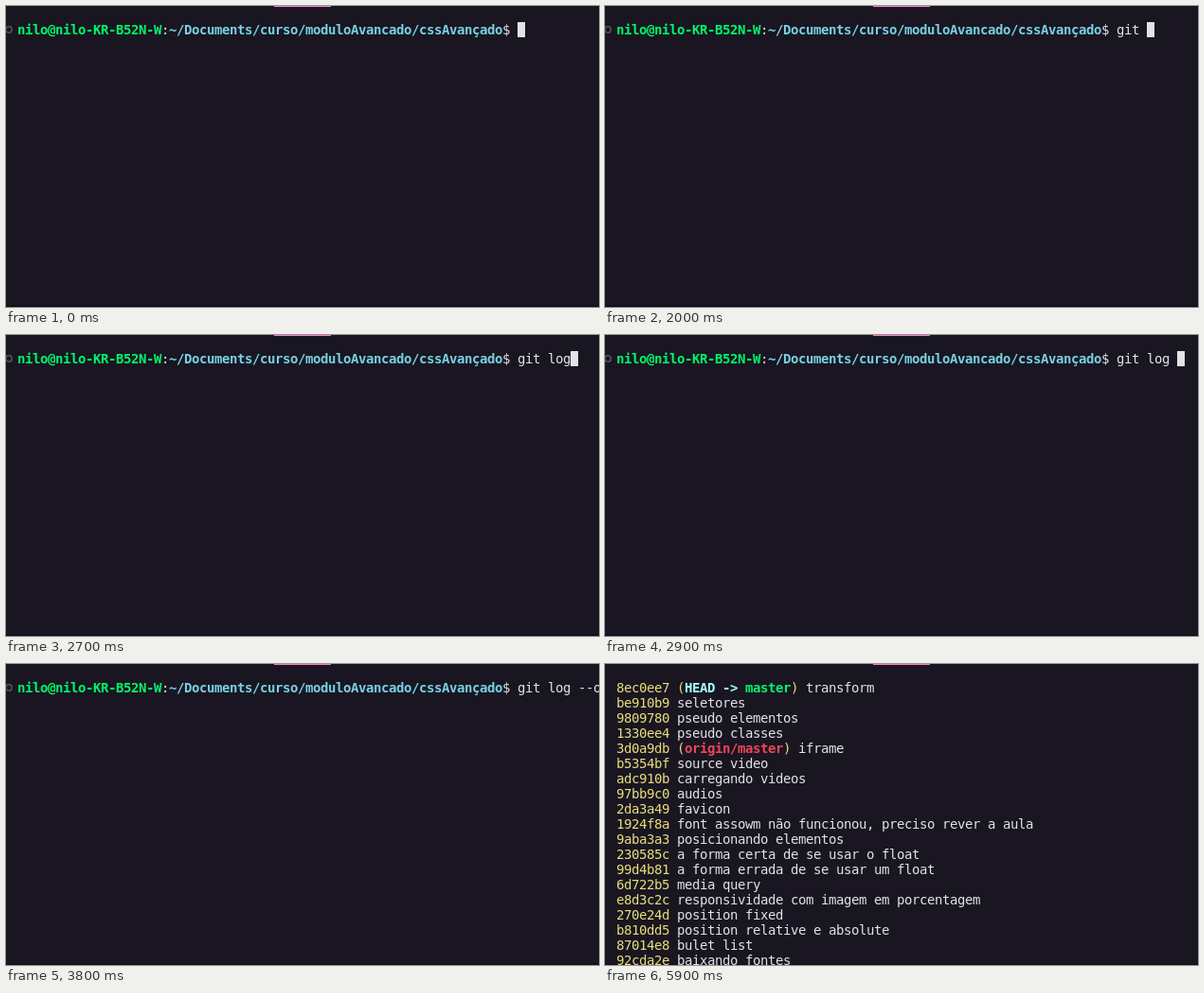
Recreate the animation shown at these times as an HTML page with a canvas. Size 626 by 318 pixels, loop 8000 ms.

```html
<!DOCTYPE html>
<html lang="pt">
<head>
<meta charset="utf-8">
<title>git log</title>
<style>
  html, body { margin: 0; width: 100%; height: 100%; overflow: hidden; background: #191622; }
  canvas { display: block; }
</style>
</head>
<body>
<canvas id="stage" width="626" height="318"></canvas>
<script>
const ctx = document.getElementById('stage').getContext('2d');
const LOOP = 8000, CELL = 8, ROW = 16, LEFT = 12, TOP = 17;
const OUTPUT_AT = 5700, SCROLL_AT = 5900;
const BACK = '#191622', FORE = '#e1e1e6', GREEN = '#00f769', BLUE = '#78d1e1',
      CYAN = '#a4ffff', YELLOW = '#e7de79', RED = '#ed4556', PINK = '#ff79c6';

const command = 'git log --o';
const keyTimes = [1400, 1600, 1800, 2000, 2100, 2400, 2700, 2900, 3100, 3300, 3800];

// Each run is [text, colour, bold].
const prompt = [
  ['nilo@nilo-KR-B52N-W', GREEN, true],
  [':', FORE],
  ['~/Documents/curso/moduloAvancado/cssAvançado', BLUE, true],
  ['$ ', FORE],
];
const refs = {
  '8ec0ee7': [['HEAD -> ', CYAN, true], ['master', GREEN, true]],
  '3d0a9db': [['origin/master', RED, true]],
};
const log = `8ec0ee7 transform
be910b9 seletores
9809780 pseudo elementos
1330ee4 pseudo classes
3d0a9db iframe
b5354bf source video
adc910b carregando videos
97bb9c0 audios
2da3a49 favicon
1924f8a font assowm não funcionou, preciso rever a aula
9aba3a3 posicionando elementos
230585c a forma certa de se usar o float
99d4b81 a forma errada de se usar um float
6d722b5 media query
e8d3c2c responsividade com imagem em porcentagem
270e24d position fixed
b810dd5 position relative e absolute
87014e8 bulet list
92cda2e baixando fontes`.split('\n').map(line => {
  const hash = line.slice(0, 7), message = line.slice(7);
  const ref = refs[hash] ? [[' (', YELLOW], ...refs[hash], [')', YELLOW]] : [];
  return [[hash, YELLOW], ...ref, [message, FORE]];
});

function rect(x, y, w, h, color) {
  ctx.fillStyle = color;
  ctx.fillRect(x, y, w, h);
}

// Draws the runs on the terminal grid and returns the x where they end.
function drawRow(runs, row) {
  let x = LEFT;
  for (const [text, color, bold] of runs) {
    ctx.font = `${bold ? 'bold ' : ''}14px "DejaVu Sans Mono", monospace`;
    ctx.fillStyle = color;
    for (const char of text) {
      ctx.fillText(char, x, TOP + row * ROW + 13);
      x += CELL;
    }
  }
  return x;
}

function drawPrompt(t) {
  ctx.strokeStyle = '#56535e';
  ctx.lineWidth = 1.5;
  ctx.beginPath();
  ctx.arc(3, 25, 3.2, 0, 2 * Math.PI);
  ctx.stroke();
  const typed = keyTimes.filter(key => key <= t).length;
  const end = drawRow([...prompt, [command.slice(0, typed), FORE]], 0);
  rect(end, TOP, CELL, ROW, FORE);
}

function draw(now) {
  const t = now % LOOP;
  rect(0, 0, 626, 318, BACK);
  rect(0, 316, 626, 2, '#15121c');
  rect(283, 0, 60, 1, PINK);
  if (t < SCROLL_AT) drawPrompt(t);
  if (t >= OUTPUT_AT) {
    const first = t < SCROLL_AT ? 1 : 0;
    log.forEach((runs, i) => drawRow(runs, first + i));
  }
  requestAnimationFrame(draw);
}
requestAnimationFrame(draw);
</script>
</body>
</html>
```
